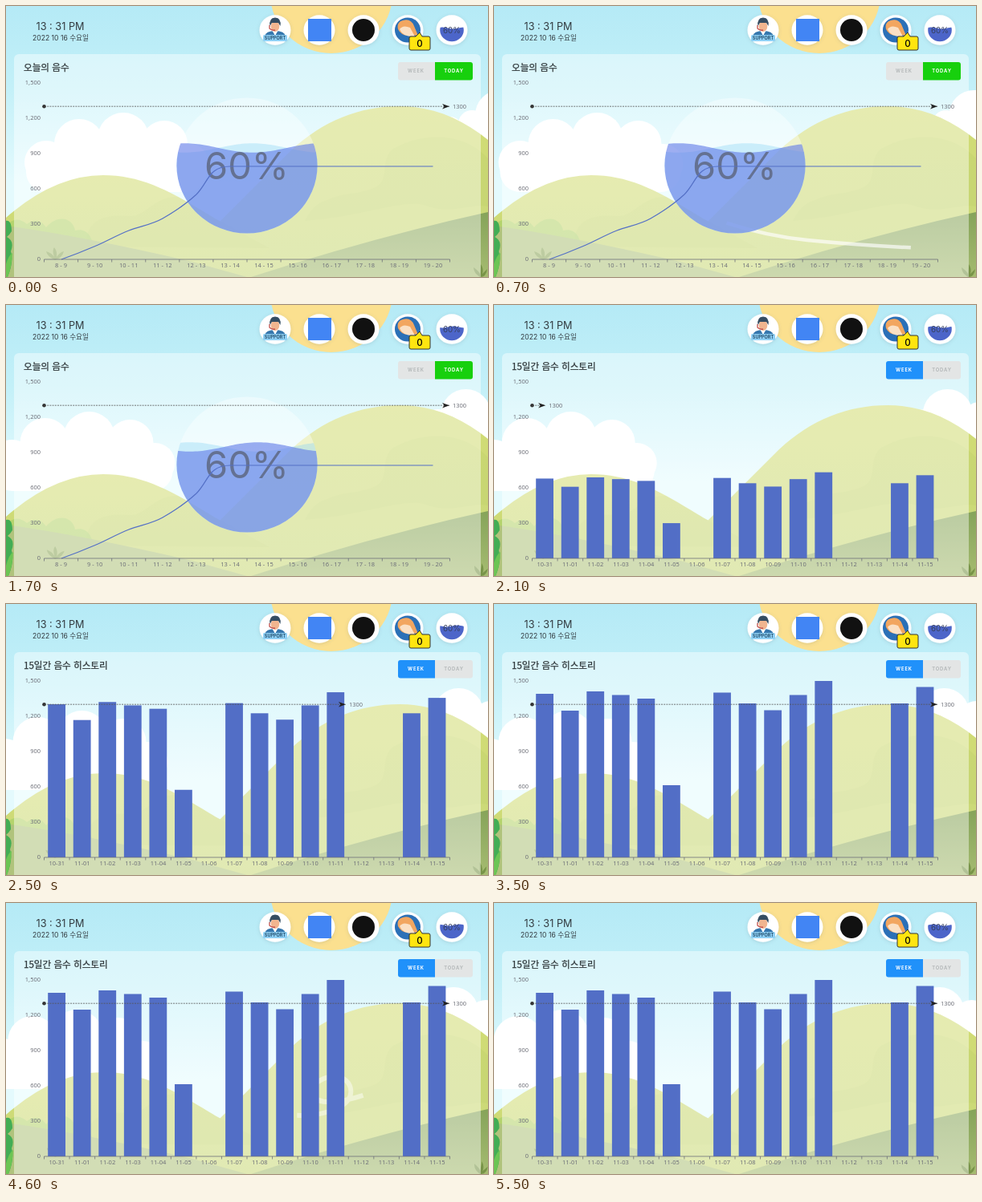
An HTML page that plays this animation: 600 px wide and 338 px high, repeating every 5600 ms.

```html
<!DOCTYPE html>
<html lang="ko">
<head>
<meta charset="utf-8">
<title>Water dashboard</title>
<style>
html, body { margin: 0; width: 100%; height: 100%; overflow: hidden; }
svg { display: block; width: 100vw; height: 100vh; font-family: "Noto Sans", "Noto Sans CJK KR", "Noto Sans CJK", sans-serif; }
.head { font-family: Inter, "Noto Sans CJK KR", "Noto Sans CJK", sans-serif; fill: #333b40; }
.title { font: 500 11.6px "Noto Sans CJK KR", "Noto Sans CJK", sans-serif; fill: #30383b; stroke: #30383b; stroke-width: .25; }
.axis text { font-size: 7.5px; fill: #6e7079; }
.tab { font: 700 5.8px Inter, sans-serif; letter-spacing: .9px; text-anchor: middle; }
.mid { text-anchor: middle; }
.end { text-anchor: end; }
.gauge { font-family: Inter, sans-serif; text-anchor: middle; }
.wind path { fill: none; stroke: #fff; }
</style>
</head>
<body>
<svg viewBox="0 0 600 338" preserveAspectRatio="none">
  <defs>
    <linearGradient id="sky" x2="0" y2="1">
      <stop stop-color="#b5eaf6"/><stop offset=".3" stop-color="#c3f0f8"/><stop offset=".65" stop-color="#e4fafd"/>
    </linearGradient>
    <linearGradient id="hill" x2="0" y2="1">
      <stop stop-color="#d2dc74"/><stop offset="1" stop-color="#c8d87a"/>
    </linearGradient>
    <linearGradient id="shade" x2="0" y2="1">
      <stop stop-color="#86a45a"/><stop offset="1" stop-color="#a5bb70"/>
    </linearGradient>
    <filter id="soft" x="-30%" y="-30%" width="160%" height="160%">
      <feDropShadow dx="0" dy="1" stdDeviation="2" flood-color="#567" flood-opacity=".2"/>
    </filter>
    <clipPath id="bigClip"><ellipse cx="300" cy="199" rx="87.600" ry="84.500"/></clipPath>
    <clipPath id="smallClip"><ellipse cx="555" cy="30" rx="14.800" ry="14.300"/></clipPath>
  </defs>

  <rect width="600" height="338" fill="url(#sky)"/>
  <ellipse cx="405" cy="-15" rx="76" ry="74" fill="#fbe08f"/>
  <g id="clouds" fill="#fff"></g>

  <path d="M225 308L264 271L355 180C395 143 440 125 490 125C530 125 567 140 600 167V338H225Z" fill="url(#hill)"/>
  <path d="M600 190C565 152 510 162 486 176C463 186 480 216 460 226C438 236 420 232 400 242C385 246 378 256 372 268C450 262 500 238 525 250C555 260 580 246 600 250Z" fill="#bdcd6c" opacity=".35"/>
  <path d="M0 264Q60 211 121 211C170 211 207 232 260 265L328 302L300 338H0Z" fill="url(#hill)"/>
  <path d="M100 300C98 262 130 260 152 262S182 238 214 238L260 265L328 302Z" fill="#bdcd6c" opacity=".35"/>
  <path d="M0 274Q12 260 26 272Q40 262 50 276C66 258 84 266 86 280C100 276 108 288 108 300H0Z" fill="#a4cf68" opacity=".6"/>
  <path d="M0 274Q95 287 232 319L300 338H0Z" fill="#b0c37c"/>
  <path d="M305 338Q455 289 600 257V338Z" fill="url(#shade)"/>
  <g class="wind">
    <path pathLength="1" stroke-width="4.500" opacity=".65" d="M250 256Q320 285 390 292T535 302"/>
    <path pathLength="1" stroke-width="6" opacity=".45" d="M335 262C390 272 438 255 428 228C418 205 375 220 382 240C390 255 430 248 470 230"/>
  </g>
  <g id="leaf" fill="#43ad55">
    <path d="M-4 338V270Q8 262 8 281Q5 286 2 288Q12 293 7 306Q11 318 3 338Z"/>
    <path d="M-3 338Q2 312 9 308Q8 326 3 338Z" fill="#6cc554"/>
  </g>
  <g fill="#789448">
    <path id="grassA" d="M61 317Q51 312 50 306Q57 308 60 313Q57 305 60 301Q64 306 63 313Q67 307 72 306Q70 314 61 317Z" opacity=".65"/>
    <path id="grassB" d="M590 338Q582 333 582 326Q588 330 590 334L591 322Q595 328 593 334L599 328Q598 338 590 338Z"/>
  </g>

  <rect x="10" y="60" width="581" height="290" rx="6" fill="#fff" opacity=".43"/>

  <g class="head">
    <text x="67.500" y="29.500" class="mid" font-size="12.700">13 : 31 PM</text>
    <text x="68" y="42.700" class="mid" font-size="8.600">2022 10 16 수요일</text>
  </g>

  <g id="discs" fill="#fff" filter="url(#soft)"></g>
  <g>
    <path d="M322 38Q323 31 335 31Q347 31 348 38Z" fill="#3677ad"/>
    <path d="M331 30H339L335 37Z" fill="#fff"/>
    <ellipse cx="335" cy="25.5" rx="5.3" ry="6.5" fill="#f1b58f"/>
    <path d="M328.5 25Q327 15 335 14.5Q343 15 341.5 25L339 21H331Z" fill="#354d62"/>
    <path d="M328 24V28Q331 31 335 30" fill="none" stroke="#c4514c" stroke-width="1.3"/>
    <rect x="320" y="36" width="30" height="8" rx="1.5" fill="#8fd0f5"/>
    <text x="335" y="42.2" class="mid" font-family="Inter, sans-serif" font-size="5.5" font-weight="700" fill="#24506f">SUPPORT</text>
    <rect x="376" y="16" width="29" height="28" fill="#4285f4"/>
    <circle cx="445" cy="30" r="14" fill="#111"/>
    <ellipse cx="500" cy="30" rx="16" ry="15.400" fill="#2b70b7"/>
    <path d="M488 29Q486 20 494 18Q504 15 508 25L513 37L505 36Q493 39 488 29Z" fill="#f2a660"/>
    <path d="M490 29Q494 23 503 27L509 38Q494 39 490 29Z" fill="#fbe0c4"/>
    <path d="M510 38L515 33L518 38H526Q528 38 528 40V53Q528 55 526 55H504Q502 55 502 53V40Q502 38 504 38Z" fill="#ffe510" stroke="#333" stroke-width="1"/>
    <text x="515" y="50.5" class="mid" font-family="Inter, sans-serif" font-size="11.5" font-weight="500">0</text>
    <path id="smallWave" fill="#4c65c9" clip-path="url(#smallClip)"/>
    <text x="555" y="34" class="gauge" font-size="9.800" fill="#37405e">60%</text>
  </g>

  <text id="title" x="22" y="80.500" class="title"></text>
  <g class="tab">
    <path id="weekBox" d="M491 70H534V92.500H491Q488 92.500 488 89.500V73Q488 70 491 70Z"/>
    <path id="todayBox" d="M534 70H578Q581 70 581 73V89.500Q581 92.500 578 92.500H534Z"/>
    <text id="weekText" x="510.500" y="83">WEEK</text>
    <text id="todayText" x="557.500" y="83">TODAY</text>
  </g>

  <g id="values" class="axis"></g>
  <g id="today">
    <ellipse cx="300" cy="199" rx="87.600" ry="84.500" fill="#fff" opacity=".36"/>
    <path id="backWave" fill="#8fd4f2" opacity=".4" clip-path="url(#bigClip)"/>
    <path id="bigWave" fill="#637de8" opacity=".62" clip-path="url(#bigClip)"/>
    <text x="299.500" y="216" class="gauge" font-size="47" fill="#555b6c" opacity=".7">60%</text>
    <path d="M69 316C83 311 97 305.500 111 299.500S139 285.500 153 280S181 273 195 265S224 247 237 235C252 220 252 200 279 200H531.500" fill="none" stroke="#5470c6" stroke-width="1.2"/>
    <g class="axis"></g>
  </g>
  <g id="week">
    <g id="bars" fill="#526ec6"></g>
    <g class="axis"></g>
  </g>
  <g class="axis">
    <circle cx="47.500" cy="125.200" r="2.300" fill="#333"/>
    <path id="goal" fill="none" stroke="#555" stroke-width=".8" stroke-dasharray="2 1.2"/>
    <g id="arrow"><path d="M0 125.200L-9 122L-6.500 125.200L-9 128.400Z" fill="#222"/><text x="4" y="127.600">1300</text></g>
  </g>
</svg>
<script>
const LOOP = 5600, STEP = 100, SWITCH = 1900;
const $ = id => document.getElementById(id);
const add = (parent, tag, attrs, text) => {
  const el = document.createElementNS('http://www.w3.org/2000/svg', tag);
  for (const key in attrs) el.setAttribute(key, attrs[key]);
  if (text) el.textContent = text;
  return parent.appendChild(el);
};
const set = (id, attrs) => { for (const key in attrs) $(id).setAttribute(key, attrs[key]); };
const clamp = v => Math.max(0, Math.min(1, v));
const cubicOut = p => 1 - (1 - p) ** 3;
const cubicInOut = p => p < .5 ? 4 * p ** 3 : 1 - 4 * (1 - p) ** 3;

// Cloud puffs: x, y, radius
[[50, 195, 27], [91, 172, 31], [146, 165, 32], [197, 172, 29], [228, 197, 25],
 [553, 152, 14], [580, 147, 17], [615, 136, 31], [655, 144, 23]]
  .forEach(([cx, cy, r]) => add($('clouds'), 'circle', { cx, cy, r }));
add($('clouds'), 'rect', { x: 25, y: 178, width: 225, height: 54, rx: 25 });
add($('clouds'), 'rect', { x: 545, y: 146, width: 220, height: 60, rx: 20 });

for (let i = 0; i < 5; i++) add($('discs'), 'ellipse', { cx: 335 + 55 * i, cy: 30, rx: 19.5, ry: 18.8 });
for (let i = 0; i < 6; i++)
  add($('values'), 'text', { x: 43, y: 317.6 - 44 * i, class: 'end' }, (300 * i).toLocaleString('en-US'));

function categoryAxis(group, labels) {
  const width = 505 / labels.length;
  let ticks = 'M47.500 316H552.500';
  labels.forEach((label, i) => {
    ticks += `M${47.5 + width * i} 316v3.500`;
    add(group, 'text', { x: 47.5 + width * (i + .5), y: 325.5, class: 'mid' }, label);
  });
  add(group, 'path', { d: ticks + 'M552.500 316v3.500', stroke: '#6e7079', 'stroke-width': .8, fill: 'none' });
}
const pad = n => String(n).padStart(2, '0');
const days = Array.from({ length: 16 }, (_, i) => i ? `${i === 9 ? 10 : 11}-${pad(i)}` : '10-31');
categoryAxis($('today').querySelector('.axis'), Array.from({ length: 12 }, (_, i) => `${i + 8} - ${i + 9}`));
categoryAxis($('week').querySelector('.axis'), days);

const heights = [204, 183, 207, 202.5, 198, 90, 0, 205.5, 192, 183.5, 202.5, 220, 0, 0, 192, 212.5];
const bars = heights.map((_, i) => add($('bars'), 'rect', { x: 52.2 + 31.56 * i, width: 21.8 }));
const winds = [...document.querySelectorAll('.wind path')];

function wave(left, right, level, amp, length, crest, bottom) {
  let d = `M${left} ${bottom}`;
  for (let i = 0; i <= 60; i++) {
    const x = left + (right - left) * i / 60;
    d += `L${x.toFixed(2)} ${(level - amp * Math.cos((x - crest) / length * 2 * Math.PI)).toFixed(2)}`;
  }
  return d + `L${right} ${bottom}Z`;
}

function blow(path, t, start) {
  const p = (t - start) / 800;
  path.style.display = p > 0 && p < 1 ? '' : 'none';
  path.setAttribute('stroke-dasharray', '.8 3');
  path.setAttribute('stroke-dashoffset', .8 - 1.8 * p);
}

function showTab(week) {
  $('today').style.display = week ? 'none' : '';
  $('week').style.display = week ? '' : 'none';
  $('title').textContent = week ? '15일간 음수 히스토리' : '오늘의 음수';
  set('weekBox', { fill: week ? '#2091fa' : '#e3e5e5' });
  set('todayBox', { fill: week ? '#e3e5e5' : '#17d00d' });
  set('weekText', { fill: week ? '#fff' : '#b5b9ba' });
  set('todayText', { fill: week ? '#b5b9ba' : '#fff' });
}

function draw(t) {
  const week = t >= SWITCH, p = clamp((t - SWITCH) / 1000), s = t / 1000;
  showTab(week);
  set('clouds', { transform: `translate(${-22 * Math.min(s, 2) - 3 * s} 0)` });
  const sway = Math.sin(s * 2 * Math.PI / 1.4);
  set('leaf', { transform: `translate(${sway - 1} 0)` });
  set('grassA', { transform: `rotate(${4 * sway} 61 317)` });
  set('grassB', { transform: `rotate(${5 * sway} 590 338)` });
  blow(winds[0], t, 280);
  blow(winds[1], t, 4200);

  const crest = 222 + 254 * s;
  set('bigWave', { d: wave(212, 388, 177, 5.8, 170, crest, 290) });
  set('backWave', { d: wave(212, 388, 177, 5.8, 170, crest + 85, 290) });
  set('smallWave', { d: wave(540, 570, 27.5, .9, 27, 543 + 40 * s, 45) });
  bars.forEach((bar, i) => {
    const h = heights[i] * cubicOut(p);
    bar.setAttribute('y', 316 - h);
    bar.setAttribute('height', h);
  });
  const end = 48 + 504 * (week ? cubicInOut(p) : 1);
  set('goal', { d: `M48 125.200H${end}` });
  set('arrow', { transform: `translate(${end} 0)` });
}

const origin = performance.now();
function tick() {
  const t = (performance.now() - origin) % LOOP;
  draw(Math.floor(t / STEP) * STEP);
  requestAnimationFrame(tick);
}
tick();
</script>
</body>
</html>
```
